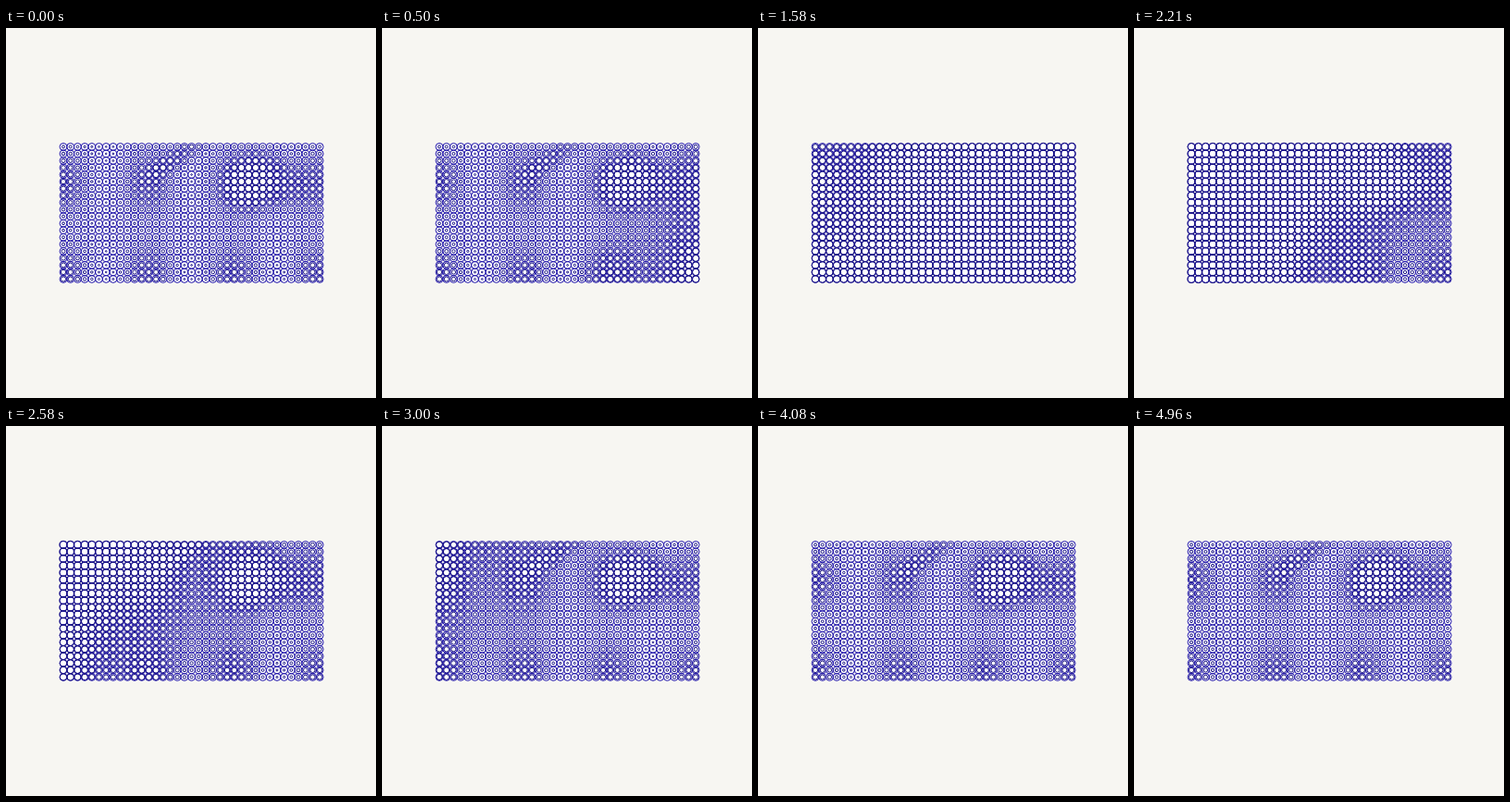
Recreate the animation shown at these times as an HTML page with a canvas. Size 400 by 400 pixels, loop 5000 ms.

```html
<!DOCTYPE html>
<html lang="en">
<head>
<meta charset="utf-8">
<title>Ring grid</title>
<style>
html, body { margin: 0; width: 100%; height: 100%; overflow: hidden; background: #f7f6f2; }
canvas { display: block; width: 400px; height: 400px; }
</style>
</head>
<body>
<canvas id="stage" width="400" height="400"></canvas>
<script>
const ctx = document.getElementById('stage').getContext('2d');
const LOOP = 5000, COLS = 37, ROWS = 20, TAU = Math.PI * 2;
const MOVE = 1320, OUTER = 3.9, FULL = 4.1;

const clamp = (v, lo, hi) => Math.min(hi, Math.max(lo, v));
const easeOut = (u, power) => 1 - (1 - clamp(u, 0, 1)) ** power;
const wave = (v, peak, period) => (1 + Math.cos(TAU * (v - peak) / period)) / 2;
const blob = (dx, dy, rx, ry) => Math.exp(-(((dx / rx) ** 2 + (dy / ry) ** 2) ** 1.5));

// Resting size of the moving ring: crossed waves, a dome and a slanted streak
function restSize(x, y) {
  const waves = .45 * wave(x, 62, 92) * (.3 + .7 * wave(y, 167, 100));
  const domeWidth = 36 + (y - 165) * .2;
  const dome = .62 * blob(x - 279, y - 165, domeWidth, 32);
  const along = (x - 188) * .83 - (y - 138) * .55;
  const across = (x - 188) * .55 + (y - 138) * .83;
  const streak = .38 * blob(along, across, 36, 11);
  return FULL * clamp(.2 + waves + dome + streak, .12, .87);
}

const cells = [];
for (let row = 0; row < ROWS; row++) {
  for (let col = 0; col < COLS; col++) {
    const x = 62 + col * 7.7, y = 128.4 + row * 7.53;
    // The wave front runs diagonally from the bottom right corner
    const lag = COLS - 1 - col + .8 * (ROWS - 1 - row);
    cells.push({ x, y, lag, rest: restSize(x, y) });
  }
}

function innerRadius({ lag, rest }, t) {
  const grow = easeOut((t - 25 * lag) / MOVE, 2.5);
  const shrink = easeOut((t - 1380 - 28 * lag) / MOVE, 2);
  return rest + (FULL - rest) * grow * (1 - shrink);
}

function ringPath(radius) {
  ctx.beginPath();
  for (const cell of cells) {
    const r = radius(cell);
    ctx.moveTo(cell.x + r, cell.y);
    ctx.arc(cell.x, cell.y, r, 0, TAU);
  }
}

function draw(now) {
  const t = now % LOOP;
  ctx.fillStyle = '#f7f6f2';
  ctx.fillRect(0, 0, 400, 400);
  ctx.fillStyle = '#fff';
  ctx.lineWidth = 1;
  ctx.strokeStyle = '#1c10a8';
  ringPath(() => OUTER);
  ctx.fill();
  ctx.stroke();
  ctx.strokeStyle = '#161080';
  ringPath(cell => innerRadius(cell, t));
  ctx.stroke();
}

const start = performance.now();
function frame() {
  draw(performance.now() - start);
  requestAnimationFrame(frame);
}
frame();
</script>
</body>
</html>
```
